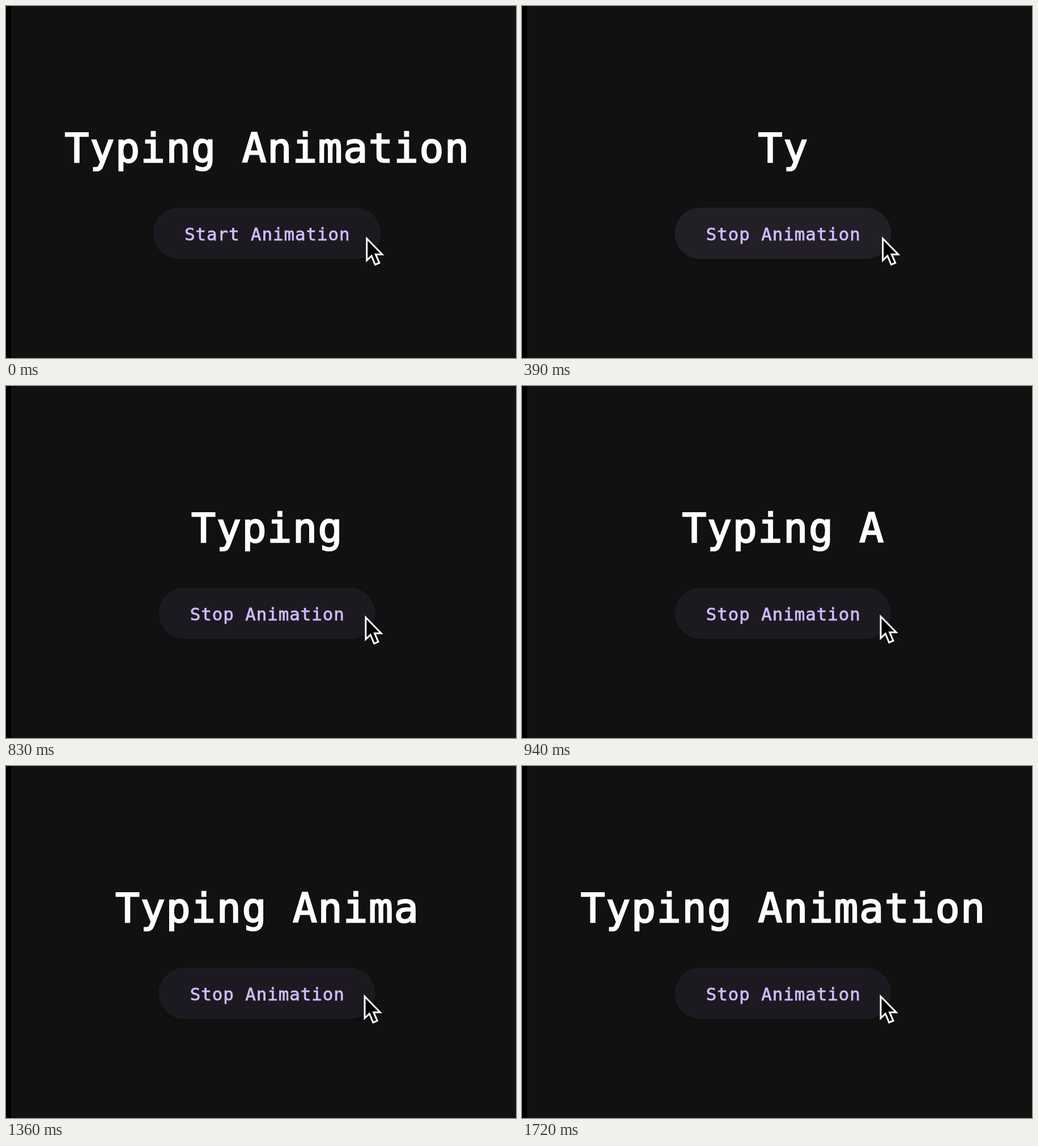
These frames come from a looping animation (900x622 px, 1830 ms). An HTML page:

```html
<!DOCTYPE html>
<html lang="en">
<head>
<meta charset="utf-8">
<title>Typing Animation</title>
<style>
  html, body { margin: 0; width: 100%; height: 100%; overflow: hidden; background: #000; }
  svg { display: block; width: 900px; height: 622px; }
  text { font-family: "DejaVu Sans Mono", "Noto Sans Mono", monospace; font-weight: 400; white-space: pre; }
  #title { font-size: 71.4px; letter-spacing: 1.72px; fill: #fff; stroke: #fff; stroke-width: 2.4px; }
  #label { font-size: 30.8px; letter-spacing: .96px; fill: #d0bcff; stroke: #d0bcff; stroke-width: .8px; }
  #pill { fill: #1c1a20; filter: drop-shadow(0 2px 2px rgba(0, 0, 0, .2)); }
  #ripple { fill: #322c37; }
  #cursor { fill: #000; stroke: #fff; stroke-width: 3; stroke-miterlimit: 8; }
</style>
</head>
<body>
<svg viewBox="0 0 900 622">
  <defs>
    <clipPath id="clip"><rect id="clipPill" y="356.3" height="91" rx="45.5"/></clipPath>
  </defs>
  <rect x="9" width="891" height="622" fill="#111"/>
  <text id="title" y="276.2"></text>
  <rect id="pill" y="356.3" height="91" rx="45.5"/>
  <g clip-path="url(#clip)"><circle id="ripple"/></g>
  <text id="label" y="414.2"></text>
  <path id="cursor" d="M636.7 411V449.5L645 441.5L651.5 457L658.8 454L652.4 439H664Z"/>
</svg>
<script>
const LOOP = 1830, MID_X = 460.5, MID_Y = 401.8;
const TITLE = "Typing Animation", TITLE_ADVANCE = 44.7;
const LABEL_ADVANCE = 19.5, PADDING = 54.6;
const PRESS = 30, RELEASE = 60, CLEAR = 119, KEY_TIME = 100;
const TOUCH = { x: 637, y: 410 };

const el = id => document.getElementById(id);
const [title, label, pill, clipPill, ripple, cursor] =
  ["title", "label", "pill", "clipPill", "ripple", "cursor"].map(el);

const clamp = v => Math.min(1, Math.max(0, v));
const lerp = (a, b, k) => a + (b - a) * k;

// cubic-bezier(.25, .1, .25, 1)
function ease(x) {
  const curve = (a, b, s) => 3 * a * s * (1 - s) ** 2 + 3 * b * s * s * (1 - s) + s ** 3;
  let lo = 0, hi = 1;
  for (let i = 0; i < 24; i++) {
    const s = (lo + hi) / 2;
    if (curve(.25, .25, s) < x) lo = s; else hi = s;
  }
  return curve(.1, 1, (lo + hi) / 2);
}

function setText(node, text, advance) {
  if (node.textContent !== text) node.textContent = text;
  node.setAttribute("x", MID_X + .7 - text.length * advance / 2);
}

function drawButton(t) {
  const text = t < RELEASE ? "Start Animation" : "Stop Animation";
  const width = text.length * LABEL_ADVANCE + 2 * PADDING;
  setText(label, text, LABEL_ADVANCE);
  for (const rect of [pill, clipPill]) {
    rect.setAttribute("x", MID_X - width / 2);
    rect.setAttribute("width", width);
  }
}

// Grows slowly while pressed, quickly after release, drifting to the centre.
function drawRipple(t) {
  const held = Math.max(0, Math.min(t, RELEASE) - PRESS) / 1000;
  const k = ease(clamp(held + Math.max(0, t - RELEASE) / 225));
  const alpha = clamp((t - PRESS) / 75) * clamp(1 - (t - RELEASE - 225) / 150);
  ripple.setAttribute("cx", lerp(TOUCH.x, MID_X, k));
  ripple.setAttribute("cy", lerp(TOUCH.y, MID_Y, k));
  ripple.setAttribute("r", lerp(59, 208, k));
  ripple.setAttribute("opacity", alpha);
}

function draw(t) {
  const count = t < CLEAR ? TITLE.length : Math.floor((t - CLEAR) / KEY_TIME);
  setText(title, TITLE.slice(0, count).trimEnd(), TITLE_ADVANCE);
  drawButton(t);
  drawRipple(t);
  const move = clamp((t - 780) / 100);
  cursor.setAttribute("transform", `translate(${-3.7 * move} ${-3.8 * move})`);
}

const start = performance.now();
function tick() {
  draw((performance.now() - start) % LOOP);
  requestAnimationFrame(tick);
}
draw(0);
requestAnimationFrame(tick);
</script>
</body>
</html>
```
